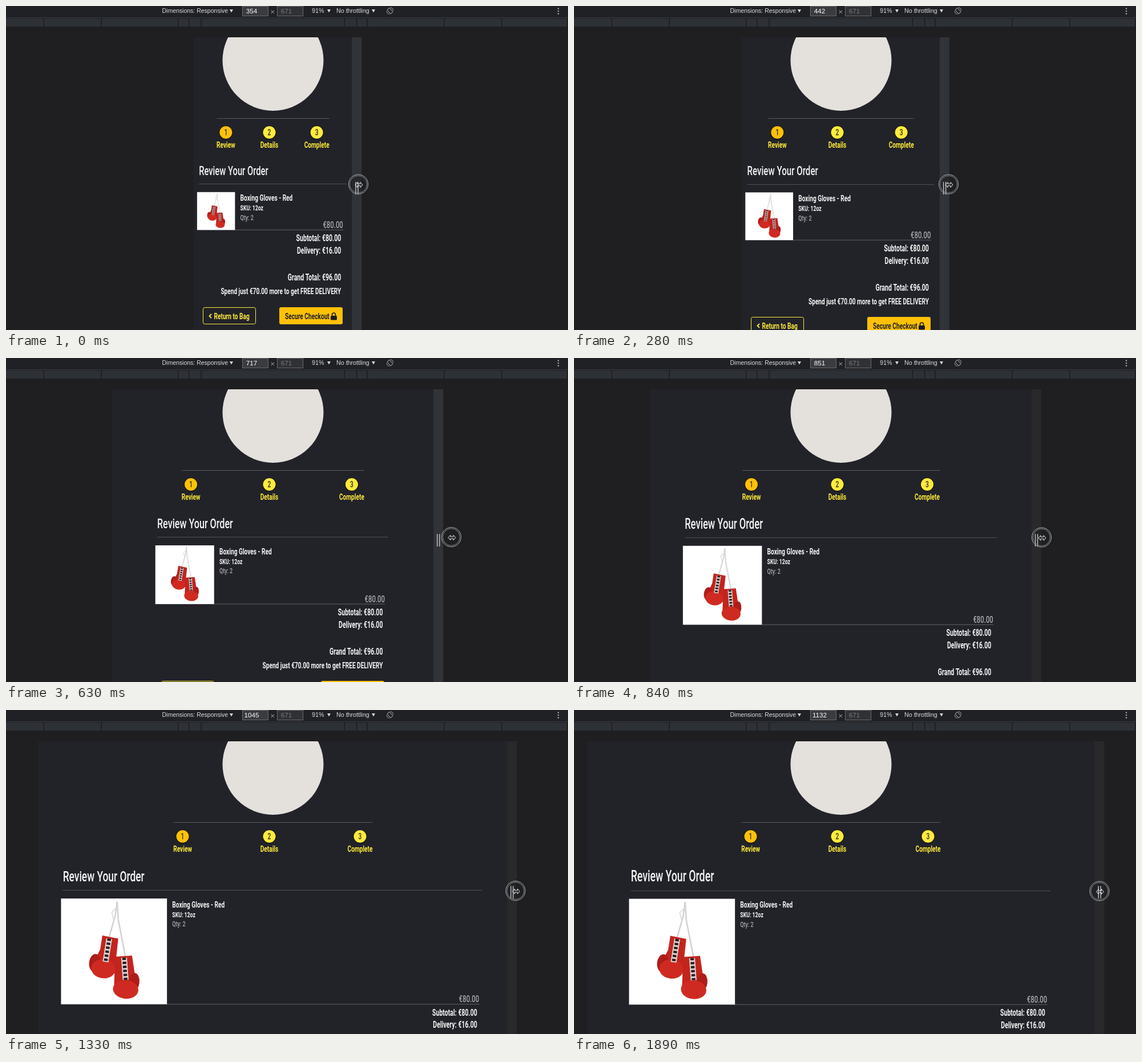
These frames come from a looping animation (985 px wide and 569 px high, 1.96 s). An HTML page with a canvas:

```html
<!DOCTYPE html>
<html lang="en">
<head>
<meta charset="utf-8">
<title>Responsive order review</title>
<style>
html, body { margin: 0; width: 100%; height: 100%; overflow: hidden; background: #1f1f21; }
canvas { display: block; }
</style>
</head>
<body>
<canvas id="stage" width="985" height="569"></canvas>
<script>
const ctx = document.getElementById('stage').getContext('2d');
const LOOP = 1960, STEP = 70;
const MID = 468, ZOOM = 0.787;
const NARROW = 0.66; // one factor turns Roboto into a condensed face
const YELLOW = '#ffeb3b', AMBER = '#ffc107', WHITE = '#f4f4f5', GREY = '#a9aaad', DARK = '#222329';

// time, viewport width, pointer x, pointer y
const KEYS = [
  [0, 354, 617.5, 313], [140, 391, 634, 313], [280, 442, 656.5, 313],
  [490, 565, 715, 314], [560, 632, 745, 314], [630, 717, 780.5, 314.5],
  [840, 851, 819.5, 315], [1120, 970, 867.5, 317], [1330, 1045, 893, 317.5],
  [1540, 1108, 914.5, 318], [1680, 1124, 919, 318], [1890, 1132, 921, 318]
];

function pose(t) {
  const i = Math.max(1, KEYS.findIndex(k => k[0] >= t));
  const a = KEYS[i - 1], b = KEYS[i], p = (t - a[0]) / (b[0] - a[0]);
  return a.map((v, n) => v + (b[n] - v) * p);
}

function rect(x, y, w, h, color) {
  ctx.fillStyle = color;
  ctx.fillRect(x, y, w, h);
}

function round(x, y, w, h, r) {
  ctx.beginPath();
  ctx.roundRect(x, y, w, h, r);
}

function disc(x, y, r, color) {
  ctx.fillStyle = color;
  ctx.beginPath();
  ctx.arc(x, y, r, 0, 7);
  ctx.fill();
}

function line(points, color, width = 1) {
  ctx.strokeStyle = color;
  ctx.lineWidth = width;
  ctx.beginPath();
  points.forEach(([x, y]) => ctx.lineTo(x, y));
  ctx.stroke();
}

function text(str, x, y, size, color, align = 'left', weight = 600) {
  ctx.save();
  ctx.translate(x, y);
  ctx.scale(NARROW, 1);
  ctx.font = `${weight} ${size}px Roboto, sans-serif`;
  ctx.textAlign = align;
  ctx.fillStyle = color;
  ctx.fillText(str, 0, 0);
  ctx.restore();
}

function label(str, x, y, size, color, align = 'left') {
  ctx.font = `${size}px "Liberation Sans", Arial, sans-serif`;
  ctx.textAlign = align;
  ctx.fillStyle = color;
  ctx.fillText(str, x, y);
}

function caret(x) {
  ctx.fillStyle = '#d5d6d8';
  ctx.beginPath();
  ctx.moveTo(x - 3, 6);
  ctx.lineTo(x + 3, 6);
  ctx.lineTo(x, 11.5);
  ctx.fill();
}

function field(x, str, color, fill) {
  rect(x, 0, 46, 18, '#6a6c70');
  rect(x + 1, 1, 44, 16, fill);
  label(str, x + 16.5, 12.7, 11.7, color, 'center');
}

function rotateIcon(x, y) {
  ctx.save();
  ctx.translate(x, y);
  ctx.rotate(-Math.PI / 4);
  ctx.strokeStyle = '#9a9c9f';
  ctx.lineWidth = 1;
  round(-2.7, -4.7, 5.4, 9.4, 1);
  ctx.stroke();
  for (const side of [0, Math.PI]) {
    ctx.beginPath();
    ctx.arc(0, 0, 5.8, side - 0.7, side + 0.7);
    ctx.stroke();
  }
  ctx.restore();
}

function toolbar(width) {
  rect(0, 0, 985, 20, '#202124');
  rect(0, 20, 985, 1, '#3a3b3f');
  rect(0, 22, 983, 14, '#2d3136');
  for (const x of [66, 167, 301.5, 320.5, 342, 593, 614.5, 633, 768, 869]) rect(x - 0.5, 22, 1.2, 14, '#16171a');
  label('Dimensions: Responsive', 273.5, 12.3, 10.5, '#dcddde');
  label('91%', 536, 12.3, 10.8, '#dcddde');
  label('No throttling', 579, 12.3, 10.7, '#dcddde');
  [395, 566, 644].forEach(caret);
  field(414, String(Math.round(width)), '#fff', '#3a3b3e');
  field(475, '671', '#77797c', '#303134');
  line([[464.5, 7.5], [470, 13]], '#b5b6b8');
  line([[470, 7.5], [464.5, 13]], '#b5b6b8');
  rotateIcon(673, 8.5);
  [4.5, 9, 13.5].forEach(y => disc(968, y, 1.2, '#b0b1b3'));
}

function glove(cuff, fist, thumb, lace) {
  ctx.fillStyle = '#c3241d';
  ctx.beginPath();
  cuff.forEach(([x, y]) => ctx.lineTo(x, y));
  ctx.fill();
  for (const [x, y, rx, ry, color] of [thumb, fist]) {
    ctx.fillStyle = color;
    ctx.beginPath();
    ctx.ellipse(x, y, rx, ry, 0.1, 0, 7);
    ctx.fill();
  }
  line(lace, '#ddd5d2', 0.055);
  ctx.setLineDash([0.022, 0.016]);
  line(lace, '#262022', 0.035);
  ctx.setLineDash([]);
}

function product(x, y, size) {
  rect(x, y, size, size, '#fff');
  ctx.save();
  ctx.translate(x, y);
  ctx.scale(size, size);
  line([[0.53, 0.03], [0.51, 0.17], [0.45, 0.38]], '#d3d3d3', 0.014);
  line([[0.53, 0.03], [0.54, 0.2], [0.61, 0.56]], '#d3d3d3', 0.014);
  line([[0.53, 0.08], [0.48, 0.13], [0.5, 0.22]], '#dedede', 0.01);
  glove([[0.39, 0.35], [0.54, 0.38], [0.51, 0.66], [0.3, 0.62], [0.37, 0.48]],
    [0.4, 0.665, 0.115, 0.09, '#cf2a21'], [0.32, 0.61, 0.055, 0.085, '#ae1d19'],
    [[0.455, 0.38], [0.42, 0.6]]);
  glove([[0.51, 0.55], [0.67, 0.54], [0.7, 0.74], [0.72, 0.86], [0.5, 0.86]],
    [0.61, 0.86, 0.12, 0.088, '#cf2a21'], [0.69, 0.79, 0.05, 0.085, '#ae1d19'],
    [[0.595, 0.56], [0.61, 0.77]]);
  ctx.restore();
}

function steps(half) {
  rect(MID - half, 197, half * 2, 1, '#56575a');
  const marks = [['Review', MID - half + 16], ['Details', 461.5], ['Complete', MID + half - 22]];
  marks.forEach(([name, x], i) => {
    disc(x, 222.3, 12.3, '#17181b');
    disc(x, 222, 11, i ? YELLOW : AMBER);
    text(i + 1, x, 227, 15.5, '#26262a', 'center', 500);
    text(name, x, 249.3, 15.4, YELLOW, 'center');
  });
}

function buttons(left, right, y) {
  ctx.strokeStyle = YELLOW;
  ctx.lineWidth = 1;
  round(left + 16.5, y + 0.5, 92, 29, 3);
  ctx.stroke();
  line([[left + 31, y + 12], [left + 27.5, y + 15.5], [left + 31, y + 19]], YELLOW, 1.8);
  text('Return to Bag', left + 35.5, y + 21, 15.4, YELLOW);

  const x = right - 128;
  ctx.fillStyle = AMBER;
  round(x, y, 111, 30, 3);
  ctx.fill();
  text('Secure Checkout', x + 10, y + 21, 15.4, '#222226');
  ctx.fillStyle = '#1c1c20';
  round(x + 90, y + 15, 11, 7.5, 1.5);
  ctx.fill();
  ctx.strokeStyle = '#1c1c20';
  ctx.lineWidth = 1.7;
  ctx.beginPath();
  ctx.moveTo(x + 92.5, y + 16);
  ctx.arc(x + 95.5, y + 13, 3, Math.PI, 0);
  ctx.lineTo(x + 98.5, y + 16);
  ctx.stroke();
}

function page(width) {
  const box = width < 576 ? width : width < 768 ? 540 : width < 992 ? 720 : 960;
  const left = MID - box * ZOOM / 2, right = MID + box * ZOOM / 2;
  const grow = width - 354, drop = grow * 0.0061;

  rect(MID - width * ZOOM / 2, 55, width * ZOOM, 514, DARK);
  ctx.save();
  ctx.beginPath();
  ctx.rect(0, 55, 985, 514);
  ctx.clip();
  disc(MID, 95.5, 88.5, '#e4e0dc');
  ctx.restore();
  steps(box < 720 ? box * 0.3295 - 18 : box < 960 ? 173 : 174.5);

  text('Review Your Order', left + 9.5, 297 + drop * 0.9, 22.4 + grow * 0.0057, WHITE, 'left', 500);
  rect(left + 9.5, Math.round(312 + drop), right - left - 20, 1, '#505154');

  const top = 326.8 + drop, size = box * ZOOM / 4 - 3.2, base = top + size;
  const textX = left + size + 15.4, sumX = right - 20;
  rect(left + 6, base - 0.5, right - left - 22, 1, '#616265');
  product(left + 6.2, top, size);
  text('Boxing Gloves - Red', textX, top + 15.5, 15.4, WHITE);
  text('SKU: 12oz', textX, top + 32.5, 13.2, WHITE);
  text('Qty: 2', textX, top + 49.3, 13.6, GREY, 'left', 500);
  text('€80.00', right - 16.5, base - 3.5, 17.2, GREY, 'right', 500);

  [['Subtotal: €80.00', 20], ['Delivery: €16.00', 41.5], ['Grand Total: €96.00', 89]]
    .forEach(([str, y]) => text(str, sumX, base + y, 16, WHITE, 'right'));
  text('Spend just €70.00 more to get FREE DELIVERY', sumX, base + 113, 15.3, WHITE, 'right');
  buttons(Math.round(left), Math.round(right), Math.round(base + 135.3));
}

function bar(x, width) {
  rect(x, 55, 17, 514, width < 780 ? '#303438' : '#29292c');
}

function grip(x) {
  rect(x + 6, 309, 1.4, 22, '#c4c5c7');
  rect(x + 10, 309, 1.4, 22, '#c4c5c7');
}

function pointer(x, y) {
  ctx.lineWidth = 1;
  for (const [r, color] of [[17, '#b4b5b7'], [15, '#85868a']]) {
    ctx.strokeStyle = color;
    ctx.beginPath();
    ctx.arc(x, y, r, 0, 7);
    ctx.stroke();
  }
  ctx.save();
  ctx.translate(x + 1, y + 1);
  for (const s of [-1, 1]) {
    line([[0, -1.7], [s * 2.5, -1.7], [s * 2.5, -4.5], [s * 6.5, 0], [s * 2.5, 4.5], [s * 2.5, 1.7], [0, 1.7]], '#ececed');
  }
  ctx.restore();
}

function draw(now) {
  const t = Math.floor(now % LOOP / STEP) * STEP;
  const [, width, x, y] = pose(t);
  const edge = MID + width * ZOOM / 2 - 1;
  rect(0, 0, 985, 569, '#1f1f21');
  page(width);
  bar(edge, width);
  disc(x, y, 17, 'rgba(30,31,34,.55)');
  grip(edge);
  pointer(x, y);
  toolbar(width);
  requestAnimationFrame(draw);
}
draw(0);
</script>
</body>
</html>
```
